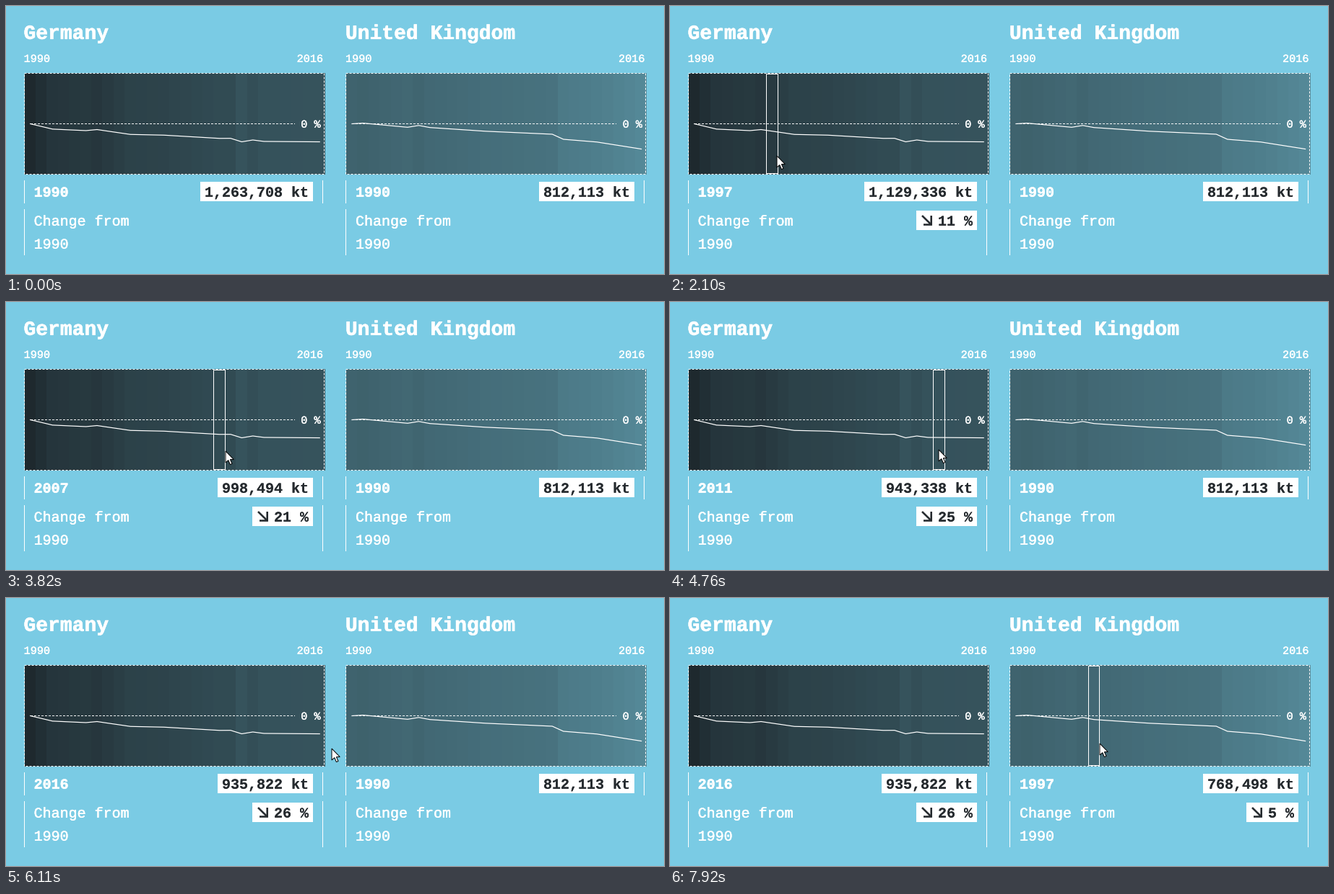
Animation of 911 by 372 pixels, one loop 8 s. Source, as a matplotlib script:

```python
import matplotlib.pyplot as plt
import numpy as np
from matplotlib.animation import FuncAnimation
from matplotlib.patches import Polygon, Rectangle
from matplotlib.patheffects import withStroke

W, H, DPI = 911, 372, 72          # at 72 dpi one point is one pixel
STEP, FRAMES = 80, 100
BG, INK = "#7acbe4", "#262b2f"
YEARS = np.arange(1990, 2017)
BAR = 416 / len(YEARS)
plt.rcParams["path.snap"] = False


def series(**turns):
    """Yearly emissions in kt, straight between the turning points."""
    xs = [int(name[1:]) for name in turns]
    return np.interp(YEARS, xs, list(turns.values()))


GERMANY = series(y1990=1263708, y1992=1167242, y1995=1139865, y1996=1158823,
                 y1999=1070361, y2002=1057423, y2007=998494, y2008=999591,
                 y2009=936412, y2010=969267, y2011=943338, y2016=935822)
UK = series(y1990=812113, y1991=819874, y1995=771509, y1996=792627,
            y1997=768498, y2002=725218, y2008=690296, y2009=631013,
            y2012=599341, y2016=517316)

# pointer path: step number, x, y
PATH = np.array([(2, 1, 214), (15, 74, 208), (37, 221, 207), (47, 304, 207),
                 (59, 372, 205), (76, 451, 209), (99, 595, 202)])

fig = plt.figure(figsize=((W + .001) / DPI, (H + .001) / DPI), dpi=DPI,
                 facecolor=BG)
ax = fig.add_axes([0, 0, 1, 1])
ax.set_xlim(0, W)
ax.set_ylim(H, 0)
ax.axis("off")


def text(x, y, s, size, weight="normal", color="white", grow=.02):
    return ax.text(x, y, s, family="Liberation Mono", size=size, weight=weight,
                   color=color, zorder=5, va="baseline",
                   path_effects=[withStroke(linewidth=size * grow,
                                            foreground=color)])


def line(xs, ys, color="white", width=1, z=4, **kw):
    return ax.plot(xs, ys, color=color, lw=width, zorder=z, **kw)[0]


def box(x, y, w, h, face="none", edge="none", z=3, **kw):
    return ax.add_patch(Rectangle((x, y), w, h, fc=face, ec=edge, zorder=z,
                                  **kw))


def shade(kt):
    part = (GERMANY[0] - kt) / 746000
    return (np.array([30, 41, 46]) + part * np.array([54, 95, 105])) / 255


class Tag:
    """White label that keeps its right edge."""

    def __init__(self, right, top):
        self.right = right
        self.back = box(right, top, 0, 27, "white")
        self.label = text(right, top + 20.7, "", 20, "bold", INK, 0)

    def show(self, s, extra=0):
        w = 12 * len(s) + 12 + extra if s else 0
        self.back.set_x(self.right - w)
        self.back.set_width(w)
        self.label.set_text(s)
        self.label.set_x(self.right - 6 - 12 * len(s))
        return self.right - w


class Panel:
    def __init__(self, dx, name, data):
        self.dx, self.data = dx, data
        px = int(dx)              # borders and boxes sit on whole pixels
        text(24.5 + dx, 45.8, name, 28, "bold")
        text(24.6 + dx, 77.7, "1990", 15.2)
        text(402.6 + dx, 77.7, "2016", 15.2)

        for k, kt in enumerate(data):
            x0, x1 = self.edges(k)
            box(x0, 93, x1 - x0, 141, shade(kt), z=1, lw=0, antialiased=False)
        box(25.5 + px, 93.5, 415, 140, edge="white", lw=1, ls=(0, (3, 2)))
        line([34 + px, 400 + px], [163.5] * 2, dashes=(3, 2),
             dash_capstyle="butt")
        text(408.2 + dx, 168.8, "0 %", 15.2)
        drop = 1 - data / data[0]
        line(33.6 + dx + BAR * np.arange(len(data)), 163.5 + 96.5 * drop,
             width=1.2)

        for x, y0, y1 in [(25.5, 242, 274), (438.5, 242, 274),
                          (25.5, 282, 346)]:
            line([x + px] * 2, [y0, y1], solid_capstyle="butt")
        self.side = line([438.5 + px] * 2, [282, 346], solid_capstyle="butt")

        self.year = text(38.6 + dx, 264.7, "", 20, "bold")
        text(38.6 + dx, 304.7, "Change from", 20)
        text(38.6 + dx, 336.7, "1990", 20)
        self.value = Tag(425 + px, 244)
        self.change = Tag(425 + px, 284)
        self.shaft, self.head = (
            line([], [], INK, 2.6, 6, solid_joinstyle="miter",
                 solid_capstyle="butt") for _ in range(2))
        self.mark = box(0, 94.5, 15, 138, edge="white", z=6, lw=1)

    def edges(self, k):
        return [round(25.5 + self.dx + BAR * j) for j in (k, k + 1)]

    def bar_at(self, x):
        return int(np.floor((x - 3 - 25.5 - self.dx) / BAR))

    def update(self, x, last_x):
        k = self.bar_at(x)
        left, right = self.edges(k)
        self.mark.set_visible(0 <= k < len(YEARS))
        self.mark.set_x(left + .5)
        self.mark.set_width(right - left)

        # the labels follow the pointer one step late
        k = int(np.clip(self.bar_at(last_x), 0, len(YEARS) - 1))
        kt = self.data[k]
        self.year.set_text(str(YEARS[k]))
        self.value.show(f"{kt:,.0f} kt")
        pct = round(100 * (kt / self.data[0] - 1))
        x0 = self.change.show(f"{abs(pct)} %" if k else "", 24)
        for part in (self.side, self.shaft, self.head):
            part.set_visible(k > 0)
        a, b = x0 + 8, x0 + 20.7
        top, end = (291, 303.5) if pct < 0 else (304, 291.5)
        self.shaft.set_data([a, b], [top, end])
        self.head.set_data([a + 2, b, b], [end, end, top])


panels = [Panel(0, "Germany", GERMANY), Panel(445.4, "United Kingdom", UK)]
SHAPE = np.array([(0, 0), (0, 16), (3.8, 12.6), (6.4, 18.6), (9, 17.5),
                  (6.4, 11.6), (11.3, 11.6)])
pointer = ax.add_patch(Polygon(SHAPE, fc="white", ec="black", lw=1, zorder=9))


def pointer_at(i):
    if i < PATH[0, 0]:
        return -40, 214
    return tuple(np.interp(i, PATH[:, 0], PATH[:, c]) for c in (1, 2))


def draw(i):
    x, y = pointer_at(i)
    last_x = pointer_at(i - 1)[0]
    for p in panels:
        p.update(x, last_x)
    pointer.set_xy(SHAPE + np.round([x, y]))
    return []


anim = FuncAnimation(fig, draw, frames=FRAMES, interval=STEP, repeat=True,
                     repeat_delay=0, init_func=lambda: draw(0))
plt.show()
```
